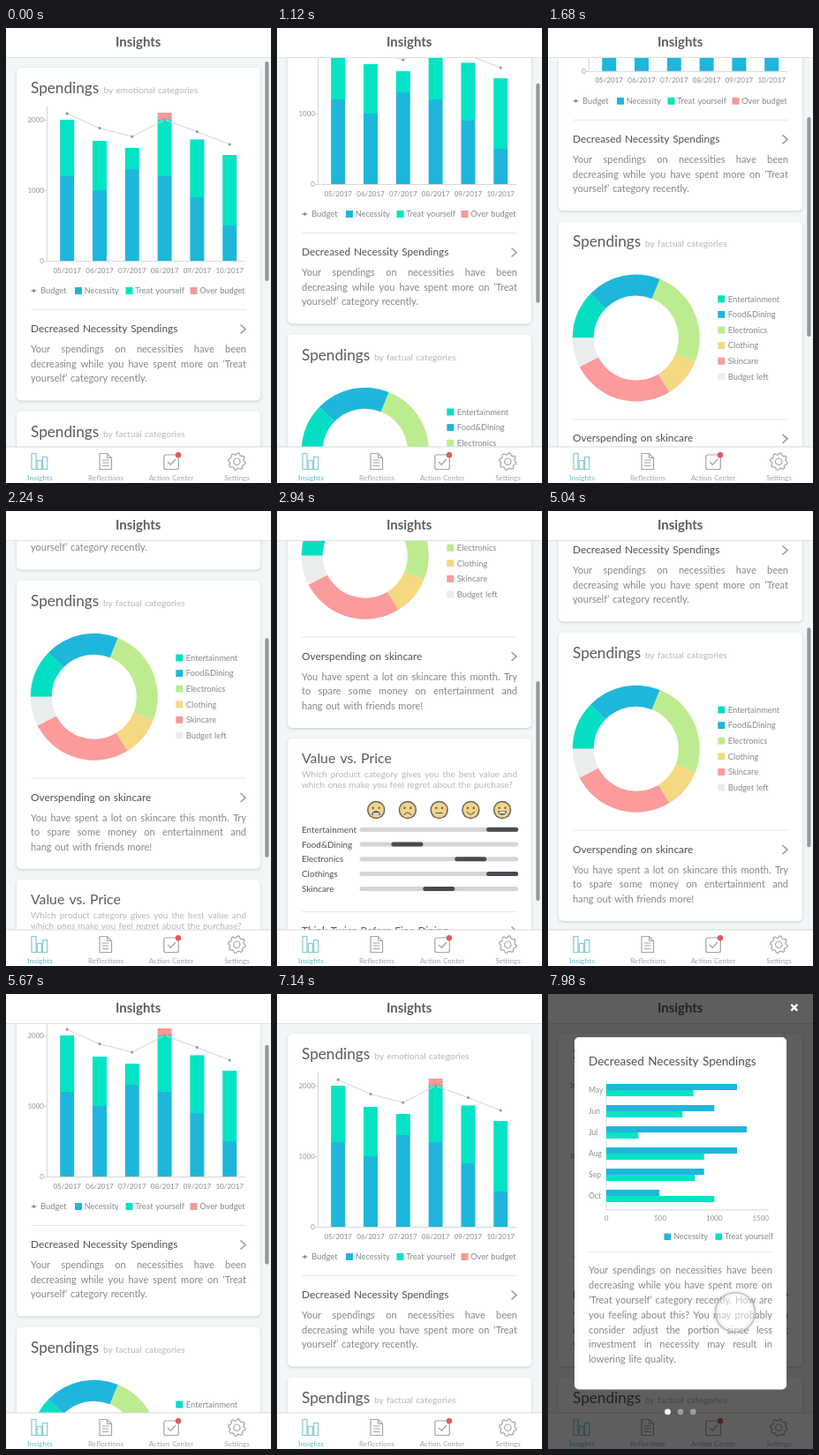
Recreate the animation shown at these times as an HTML page with a canvas. Size 300 by 516 pixels, loop 8 s.

```html
<!DOCTYPE html>
<html lang="en">
<head>
<meta charset="utf-8">
<title>Insights</title>
<style>
  html, body { margin: 0; width: 100%; height: 100%; overflow: hidden; background: #f3f6f6; }
  canvas { display: block; width: 300px; height: 516px; }
</style>
</head>
<body>
<canvas id="stage"></canvas>
<script>
const W = 300, H = 516, LOOP = 8000, STEP = 70;
const BLUE = '#1fb6dc', TEAL = '#03e4c4', PINK = '#f59a94';
const INK = '#4e5153', HEAD = '#585b5d', BODY = '#85878a', PALE = '#b5b7b9', RULE = '#e6e8e9';

const canvas = document.getElementById('stage');
const ratio = window.devicePixelRatio || 1;
canvas.width = W * ratio;
canvas.height = H * ratio;
const ctx = canvas.getContext('2d');

// ---------- motion ----------
// time, scroll position, velocity (px per ms)
const SCROLL = [
  [350, 0, 0], [1120, 87, 0.19], [2240, 356, 0.235], [2940, 516, 0.2], [3570, 611, 0],
  [3640, 611, 0], [4410, 537, -0.25], [5670, 57, -0.25], [6090, 0, 0]
];

function scrollAt(t) {
  if (t <= SCROLL[0][0]) return 0;
  for (let i = 1; i < SCROLL.length; i++) {
    const [t0, p0, v0] = SCROLL[i - 1], [t1, p1, v1] = SCROLL[i];
    if (t > t1) continue;
    const d = t1 - t0, u = (t - t0) / d, w = 1 - u;
    return p0 * (1 + 2 * u) * w * w + v0 * d * u * w * w
         + p1 * u * u * (3 - 2 * u) - v1 * d * u * u * w;
  }
  return 0;
}

function ramp(t, from, to) {
  const u = Math.min(1, Math.max(0, (t - from) / (to - from)));
  return u * u * (3 - 2 * u);
}

// ---------- drawing helpers ----------
function text(str, x, y, size, color, align = 'left', weight = 400) {
  ctx.font = `${weight} ${size}px Lato, sans-serif`;
  ctx.wordSpacing = size * 0.07 + 'px';
  ctx.textAlign = align;
  ctx.fillStyle = color;
  ctx.fillText(str, x, y);
}

function paragraph(lines, x, y, width, lead, size, color) {
  lines.forEach((line, i) => {
    const by = y + i * lead;
    if (i === lines.length - 1) return text(line, x, by, size, color);
    const words = line.split(' ');
    ctx.font = `400 ${size}px Lato, sans-serif`;
    const widths = words.map(w => ctx.measureText(w).width);
    const gap = (width - widths.reduce((a, b) => a + b, 0)) / (words.length - 1);
    let wx = x;
    words.forEach((w, k) => {
      text(w, wx, by, size, color);
      wx += widths[k] + gap;
    });
  });
}

function rect(x, y, w, h, color) {
  ctx.fillStyle = color;
  ctx.fillRect(x, y, w, h);
}

function round(x, y, w, h, r, color) {
  ctx.beginPath();
  ctx.roundRect(x, y, w, h, r);
  ctx.fillStyle = color;
  ctx.fill();
}

function dot(x, y, r, color) {
  ctx.beginPath();
  ctx.arc(x, y, r, 0, Math.PI * 2);
  ctx.fillStyle = color;
  ctx.fill();
}

function path(points, color, width = 1, close = false) {
  ctx.beginPath();
  points.forEach(([x, y]) => ctx.lineTo(x, y));
  if (close) ctx.closePath();
  ctx.strokeStyle = color;
  ctx.lineWidth = width;
  ctx.stroke();
}

function card(y, h) {
  ctx.save();
  ctx.shadowColor = 'rgba(60,75,80,0.24)';
  ctx.shadowBlur = 3 * ratio;
  ctx.shadowOffsetY = ratio;
  round(12, y, 276, h, 5, '#fff');
  ctx.restore();
}

function insight(y, title, lines) {
  rect(28, y, 244, 1, RULE);
  text(title, 28, y + 26, 11.85, INK);
  path([[265.5, y + 17.5], [271, y + 22.5], [265.5, y + 27.5]], '#9a9d9f', 1.6);
  paragraph(lines, 28, y + 49, 244, 16.7, 11.05, BODY);
}

// ---------- cards ----------
const MONTHS = [
  // need, total, budget
  [1200, 2000, 2085], [1000, 1700, 1880], [1300, 1600, 1762],
  [1200, 2000, 2000], [900, 1720, 1830], [500, 1500, 1650]
];

function spendings() {
  card(45, 377.5);
  text('Spendings', 28, 74.3, 17.2, HEAD);
  text('by emotional categories', 110.5, 74.3, 10.1, PALE);

  const py = v => 264 - v * 0.08;
  rect(46, 89, 1, 176, '#d5d8da');
  [0, 1000, 2000].forEach(v => {
    rect(42, py(v), 4, 1, '#d5d8da');
    text(v, 43, py(v) + 3, 8, '#94979a', 'right');
  });
  rect(42, 264, 229, 1, '#d5d8da');

  const cx = i => 69.2 + i * 36.8;
  MONTHS.forEach(([need, total], i) => {
    const x = cx(i) - 8;
    rect(x, py(total), 16, (total - need) * 0.08, TEAL);
    rect(x, py(need), 16, need * 0.08, BLUE);
    if (i === 3) rect(x, py(2100), 16, 8, PINK);
    text(String(i + 5).padStart(2, '0') + '/2017', cx(i), 277.5, 8, '#888b8d', 'center');
  });
  const line = MONTHS.map((m, i) => [cx(i), py(m[2])]);
  path(line, '#d3d5d6', 1);
  line.forEach(([x, y]) => dot(x, y, 1.6, '#999'));

  path([[28, 298], [35, 298]], '#aaa', 1);
  dot(31.5, 298, 1.7, '#888');
  text('Budget', 39, 301, 9.4, BODY);
  [['Necessity', 78, BLUE], ['Treat yourself', 135.5, TEAL], ['Over budget', 208.5, PINK]].forEach(([s, x, c]) => {
    rect(x, 294, 8, 8, c);
    text(s, x + 10.7, 301, 9.2, BODY);
  });

  insight(319, 'Decreased Necessity Spendings', [
    'Your spendings on necessities have been',
    'decreasing while you have spent more on ‘Treat',
    'yourself’ category recently.'
  ]);
}

const SLICES = [
  ['Entertainment', 44, '#04dfc4'], ['Food&Dining', 112, BLUE], ['Electronics', 202, '#bdec90'],
  ['Clothing', 238.5, '#f5d881'], ['Skincare', 333, '#fb9b9b'], ['Budget left', 360, '#eaeded']
];

function factual() {
  card(434.5, 327.5);
  text('Spendings', 28, 463.6, 17.2, HEAD);
  text('by factual categories', 110, 463.6, 10.1, PALE);

  const rad = a => (a + 180) * Math.PI / 180;
  let from = 0;
  SLICES.forEach(([name, to, color], i) => {
    ctx.beginPath();
    ctx.arc(99.8, 566.7, 72, rad(from), rad(to));
    ctx.arc(99.8, 566.7, 48, rad(to), rad(from), true);
    ctx.fillStyle = color;
    ctx.fill();
    from = to;
    const y = 522.5 + i * 17.6;
    rect(192.3, y - 4, 8, 8, color);
    text(name, 203.8, y + 3.2, 9.3, BODY);
  });

  insight(658.5, 'Overspending on skincare', [
    'You have spent a lot on skincare this month. Try',
    'to spare some money on entertainment and',
    'hang out with friends more!'
  ]);
}

function face(x, y, mood) {
  const dark = '#67635b';
  dot(x, y, 10.2, dark);
  dot(x, y, 8.7, '#f1d58a');
  dot(x - 3.4, y - 2.3, 1.2, dark);
  dot(x + 3.4, y - 2.3, 1.2, dark);
  ctx.beginPath();
  ctx.lineWidth = 1.2;
  ctx.strokeStyle = dark;
  if (mood === 2) {
    ctx.moveTo(x - 4, y + 3.5);
    ctx.lineTo(x + 4, y + 3.5);
    ctx.stroke();
  } else if (mood === 1 || mood === 3) {
    const s = mood === 3 ? 1 : -1;
    ctx.moveTo(x - 4.3, y + 4 - s * 2);
    ctx.quadraticCurveTo(x, y + 4 + s * 4, x + 4.3, y + 4 - s * 2);
    ctx.stroke();
  } else {
    const up = mood === 0;
    ctx.arc(x, up ? y + 6 : y + 1, 5, up ? Math.PI : 0, up ? 0 : Math.PI);
    ctx.closePath();
    ctx.fillStyle = dark;
    ctx.fill();
    rect(x - 3.2, up ? y + 3.6 : y + 1.8, 6.4, 2, '#fff');
  }
}

const RATINGS = [['Entertainment', 4], ['Food&Dining', 1], ['Electronics', 3], ['Clothings', 4], ['Skincare', 2]];

function value() {
  card(774, 300);
  text('Value vs. Price', 28, 802.3, 15.8, HEAD);
  paragraph([
    'Which product category gives you the best value and',
    'which ones make you feel regret about the purchase?'
  ], 28, 818.2, 244, 12, 10, PALE);
  RATINGS.forEach(([name, level], i) => {
    face(112.2 + i * 35.7, 855, i);
    const y = 877.2 + i * 16.8;
    text(name, 28, y + 3.5, 9.9, INK);
    round(93.5, y - 2.5, 179.5, 5, 2.5, '#d4d5d6');
    round(93.5 + level * 35.9, y - 2.5, 36, 5, 2.5, '#484b4f');
  });
  insight(970, 'Think Twice Before Fine Dining', [
    'You feel more regret about dining out than any',
    'other category. Try to save fine dinners for the',
    'days that matter to you.'
  ]);
}

// ---------- fixed bars ----------
function header() {
  rect(0, 0, W, 33, '#fff');
  rect(0, 33, W, 1, '#dfe2e2');
  text('Insights', 149.7, 21, 14.9, '#5a5d5f', 'center', 700);
}

function tabs() {
  const on = '#86ccd2', off = '#a3a5a7';
  rect(0, 475, W, 41, '#fff');
  rect(0, 474.5, W, 1, '#d8dbdc');

  ctx.strokeStyle = on;
  ctx.lineWidth = 1.2;
  [[29, 482.5], [35.3, 490.5], [41.6, 486.5]].forEach(([x, y]) => ctx.strokeRect(x, y, 5, 500.5 - y));

  path([[106, 482.5], [114.5, 482.5], [119.5, 487.5], [119.5, 500.5], [106, 500.5]], off, 1.2, true);
  path([[114.5, 482.5], [114.5, 487.5], [119.5, 487.5]], off, 1);
  [490, 493, 496.5].forEach(y => path([[109, y], [116.5, y]], off, 1));

  ctx.beginPath();
  ctx.roundRect(178.8, 484, 16.5, 16.5, 2);
  ctx.strokeStyle = off;
  ctx.lineWidth = 1.2;
  ctx.stroke();
  path([[183, 492], [186.3, 495.3], [192, 489]], off, 1.3);
  dot(195, 484.3, 3.2, '#e4595c');

  const gear = [];
  for (let i = 0; i < 32; i++) {
    const a = (i + 0.5) * Math.PI / 16, r = i % 4 < 2 ? 9.8 : 7.9;
    gear.push([261.3 + r * Math.cos(a), 491.7 + r * Math.sin(a)]);
  }
  path(gear, off, 1.2, true);
  ctx.beginPath();
  ctx.arc(261.3, 491.7, 3.7, 0, Math.PI * 2);
  ctx.stroke();

  text('Insights', 38.5, 512.5, 8.4, on, 'center', 700);
  text('Reflections', 113, 512.5, 8.2, off, 'center');
  text('Action Center', 187, 512.5, 8.2, off, 'center');
  text('Settings', 261.5, 512.5, 8.2, off, 'center');
}

// ---------- pop-up ----------
const COMPARE = [
  ['May', 1210, 805], ['Jun', 1000, 705], ['Jul', 1300, 297],
  ['Aug', 1210, 905], ['Sep', 905, 820], ['Oct', 492, 1000]
];

function popup(alpha) {
  ctx.save();
  ctx.globalAlpha = alpha;
  rect(0, 0, W, H, 'rgba(0,0,0,0.63)');
  path([[275.3, 11.8], [282.3, 18.8]], '#fff', 2.4);
  path([[282.3, 11.8], [275.3, 18.8]], '#fff', 2.4);
  round(30, 49, 240, 399.5, 5, '#fff');
  text('Decreased Necessity Spendings', 46, 81.3, 13.5, INK);

  const k = 0.1223;
  rect(65.5, 97, 1, 148, '#dcdfe0');
  COMPARE.forEach(([name, need, treat], i) => {
    const y = 102 + i * 24;
    text(name, 46, y + 10.3, 8.6, '#8c8f91');
    rect(66, y, need * k, 7, BLUE);
    rect(66, y + 7, treat * k, 7, TEAL);
  });
  rect(66, 244.5, 184, 1, '#d5d8da');
  [0, 500, 1000].forEach(v => text(v, 66 + v * k, 257, 8, '#94979a', 'center'));
  text('1500', 250, 257, 8, '#94979a', 'right');

  rect(131.5, 271.5, 7.5, 7.5, BLUE);
  text('Necessity', 142, 278.3, 9.2, BODY);
  rect(189.5, 271.5, 7.5, 7.5, TEAL);
  text('Treat yourself', 200, 278.3, 9.1, BODY);
  rect(46, 292, 208, 1, RULE);

  paragraph([
    'Your spendings on necessities have been',
    'decreasing while you have spent more on',
    '‘Treat yourself’ category recently. How are',
    'you feeling about this? You may probably',
    'consider adjust the portion since less',
    'investment in necessity may result in',
    'lowering life quality.'
  ], 46, 317.3, 208, 16.8, 11.05, BODY);

  dot(135.5, 473.8, 3.4, '#fff');
  dot(150, 473.8, 3.4, 'rgba(255,255,255,0.4)');
  dot(164.3, 473.8, 3.4, 'rgba(255,255,255,0.4)');
  ctx.restore();
}

function touch(alpha) {
  ctx.save();
  ctx.globalAlpha = alpha;
  dot(212, 361, 23, 'rgba(255,255,255,0.5)');
  ctx.beginPath();
  ctx.arc(212, 361, 22.5, 0, Math.PI * 2);
  ctx.shadowColor = 'rgba(0,0,0,0.35)';
  ctx.shadowBlur = 4 * ratio;
  ctx.strokeStyle = 'rgba(165,165,165,0.6)';
  ctx.lineWidth = 1.6;
  ctx.stroke();
  ctx.restore();
}

function draw(t) {
  ctx.setTransform(ratio, 0, 0, ratio, 0, 0);
  rect(0, 0, W, H, '#f3f6f6');

  ctx.save();
  ctx.translate(0, -scrollAt(t));
  spendings();
  factual();
  value();
  ctx.restore();

  header();
  tabs();

  // the scroll thumb trails the content slightly
  const bar = 1 - ramp(t, 6230, 6580);
  const thumb = 38 + scrollAt(t - 30) * 0.304;
  if (bar > 0) round(293.3, thumb, 4.2, 249, 2.1, `rgba(85,90,94,${0.6 * bar})`);

  const open = ramp(t, 7490, 7840);
  if (open > 0) popup(open);
  const press = ramp(t, 7210, 7420);
  if (press > 0) touch(press);
}

const start = performance.now();
function frame() {
  const t = (performance.now() - start) % LOOP;
  draw(Math.floor(t / STEP) * STEP);
  requestAnimationFrame(frame);
}
frame();
</script>
</body>
</html>
```
